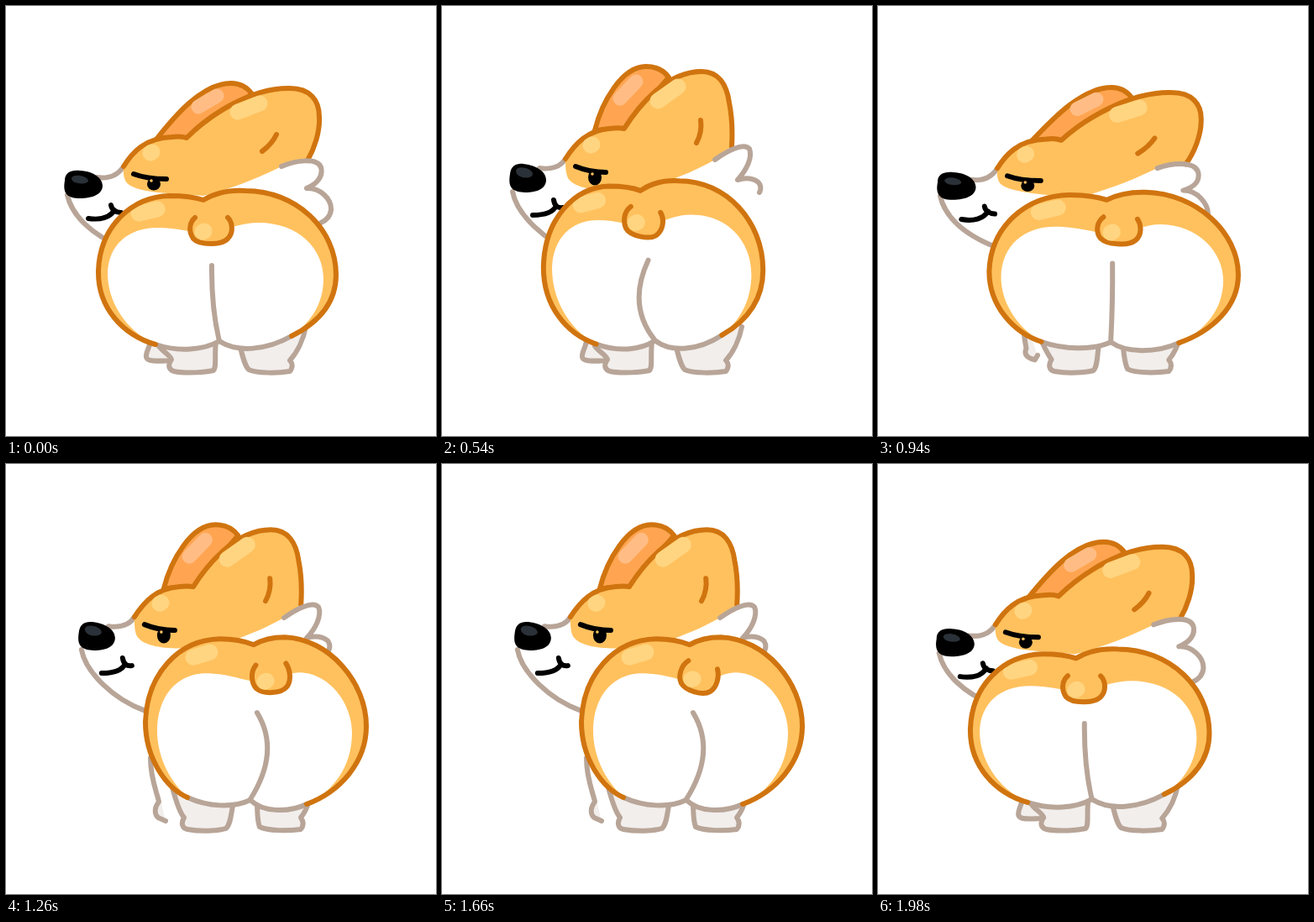
Write an HTML page that moves like this. It is 512x512 px and loops after 2000 ms.

```html
<!DOCTYPE html>
<html lang="en">
<head>
<meta charset="utf-8">
<title>Bouncing corgi</title>
<style>
  html, body { margin: 0; width: 100%; height: 100%; overflow: hidden; background: #fff; }
  svg { display: block; width: 100%; height: 100%; }
  path { fill: none; stroke-width: 6; stroke-linecap: round; stroke-linejoin: round; vector-effect: non-scaling-stroke; }
  .rim { stroke: #d0740f; }
  .grey { stroke: #b8a598; }
  .ink { stroke: #000; }
  .foot { fill: #f2eeec; }
  .fur { fill: #ffc15e; }
  .inner { fill: #ffa551; }
  .white { fill: #fff; }
  .black { fill: #000; }
  .gleam { fill: #2b3138; }
  .shine { stroke: #ffd581; stroke-width: 19; }
  .blush { stroke: #ffbd85; stroke-width: 17; }
</style>
</head>
<body>
<svg viewBox="0 0 512 512">
  <g id="legs"></g>
  <g id="head"></g>
  <g id="rump"></g>
</svg>
<script>
const LOOP = 2000, HALF = 1000, BOUNCE = 400;
const layer = id => document.getElementById(id);
const legs = layer('legs'), head = layer('head'), rump = layer('rump');

const lerp = (a, b, t) => a + (b - a) * t;
const clamp = x => Math.min(1, Math.max(0, x));
const smooth = x => { x = clamp(x); return x * x * (3 - 2 * x); };

// Blend two path strings that share the same commands.
function morph(a, b, t) {
  const to = b.match(/-?[\d.]+/g);
  let i = 0;
  return a.replace(/-?[\d.]+/g, n => lerp(+n, +to[i++], t).toFixed(2) + ' ');
}

function add(parent, cls, tag = 'path') {
  const el = document.createElementNS('http://www.w3.org/2000/svg', tag);
  el.setAttribute('class', cls);
  return parent.appendChild(el);
}

// Each part: [layer, class, path at first pose, path at second pose, optional smirk path].
// Legs and rump blend left to right, the head blends stretched to squashed.
const earTop = [
  'M140 191C150 175 165 157 197 156C205 155 212 156 215 157C240 132 290 97 338 98C362 98 373 112 373 132C374 150 367 170 359 184',
  'M153 182C165 163 180 148 205 146C213 145 219 145 223 146C238 122 272 78 315 78C335 78 345 93 348 115C352 135 352 150 351 167'];
const patch = [
  'L328 191C300 205 270 217 235 226C205 223 150 224 142 208C139 200 140 196 140 191Z',
  'L331 183C310 195 290 203 265 212C225 222 168 224 156 205C153 198 153 190 153 182Z'];
const back = [
  'M178 403C140 392 109 360 110 315C112 262 150 227 195 226C212 226 226 228 235 231C250 222 268 219 285 220C345 220 393 265 393 320C393 355 370 378 340 393',
  'M216 397C190 385 166 350 166 307C168 250 205 209 255 208C272 208 285 211 295 215C305 209 318 206 332 206C385 208 429 260 429 312C429 355 398 390 358 405'];
const under = [
  'C310 410 275 413 254 399C235 410 205 412 178 403',
  'C335 416 305 414 291 400C270 410 240 408 216 397'];
const cheeks = [
  'M178 403C140 385 121 350 121 318C122 285 145 264 180 264C205 264 222 270 243 272C262 266 280 258 300 258C350 258 378 290 378 325C378 355 362 378 340 393',
  'M216 397C192 375 180 345 180 318C180 275 205 249 238 249C262 249 285 258 310 262C325 256 335 248 350 248C385 249 412 285 412 320C412 360 390 390 358 405'];
const join = (a, b) => a.map((s, i) => s + b[i]);

const parts = [
  [legs, 'grey foot',
    'M172 395C173 405 166 411 167 418C168 424 180 423 197 422L190 400',
    'M172 350C172 375 180 392 182 402C176 410 177 417 181 421C190 425 205 423 212 422L200 385'],
  [legs, 'grey foot',
    'M182 405C187 412 195 415 197 421C192 428 194 433 200 435C215 438 238 436 247 434C251 430 248 415 250 400',
    'M198 385C202 400 207 415 212 421C208 428 210 434 216 435C232 438 252 437 262 434C268 428 268 415 271 402'],
  [legs, 'grey foot',
    'M278 402C281 415 284 428 289 433C300 438 325 437 338 435C342 430 341 425 338 422C346 413 354 398 357 382',
    'M299 400C299 412 299 425 302 432C312 437 335 437 351 435C355 430 354 425 351 421C356 415 359 408 361 400'],

  [head, 'rim inner',
    'M178 160C200 132 233 92 268 92C281 92 288 98 293 105L215 157Z',
    'M188 148C196 115 220 72 249 72C263 72 271 78 276 85L223 146Z'],
  [head, 'blush', 'M229 120L251 107', 'M218 110L237 90'],
  [head, 'grey',
    'M73 225C78 248 100 272 140 288', 'M90 221C95 248 128 280 166 294'],
  [head, 'grey',
    'M140 191C133 202 122 206 108 204', 'M153 182C147 192 135 195 122 193'],
  [head, 'fur', ...join(earTop, patch)],
  [head, 'rim', ...earTop],
  [head, 'grey',
    'M328 191C345 184 370 180 375 192C378 203 370 212 358 217C374 216 388 230 387 243C386 250 382 255 375 258',
    'M331 183C345 173 365 162 372 170C376 180 369 195 358 207C372 203 383 207 385 214C386 218 385 220 384 222'],
  [head, 'shine', 'M276 126L302 116', 'M263 113L287 96'],
  [head, 'shine', 'M172 175L174 174', 'M183 166L185 165'],
  [head, 'rim', 'M305 173Q317 164 322 153', 'M309 163Q316 150 314 136'],
  [head, 'black',
    'M70 208C70 198 78 195 88 196C106 197 115 206 115 214C115 224 103 229 88 229C74 229 67 224 70 208Z',
    'M87 200C88 190 95 187 103 188C120 190 130 198 130 207C130 217 120 222 105 222C91 221 84 218 87 200Z'],
  [head, 'gleam',
    'M78 205C80 199 97 202 98 208C98 213 78 213 78 205Z',
    'M94 196C96 189 113 193 114 200C114 207 94 206 94 196Z'],
  [head, 'ink',
    'M152 200C165 205 178 206 191 206', 'M165 191C177 196 190 198 201 198',
    'M162 188C168 197 180 200 194 200'],
  [head, 'ink',
    'M125 237C126 243 131 246 137 246M129 243C124 252 112 255 98 253',
    'M139 231C140 238 144 241 150 240M142 238C138 246 128 249 114 249',
    'M122 229C123 234 127 237 133 237M125 236C126 250 116 256 104 252'],

  [rump, 'fur', ...join(back, under)],
  [rump, 'shine', 'M158 247L180 242', 'M223 230L243 224'],
  [rump, 'white', ...join(cheeks, under)],
  [rump, 'grey', ...join(['M340 393', 'M358 405'], under)],
  [rump, 'rim', ...back]
].map(([group, cls, a, b, smirk]) => ({ el: add(group, cls), group, a, b, smirk }));

const eye = add(head, 'black', 'ellipse');
const glint = add(head, 'fur', 'circle');
const crack = add(rump, 'grey');
const tail = add(rump, '', 'g');
const tailBody = add(tail, 'rim fur'), tailShine = add(tail, 'shine');

const set = (el, attrs) => { for (const k in attrs) el.setAttribute(k, attrs[k]); };

function draw(now) {
  const t = now % LOOP, u = t % HALF;
  const step = smooth((u - 870) / 120);
  const side = t < HALF ? step : 1 - step;
  const hopping = u < 2 * BOUNCE;

  // 1 is squashed, 0 is tall; the crossing dips lower still.
  const squash = hopping
    ? 0.375 + 0.625 * Math.cos(2 * Math.PI * u / BOUNCE)
    : 1 + 0.4 * Math.sin(Math.PI * (u - 800) / 200) ** 2;
  const smirk = smooth(1 - Math.abs(t - 330) / 180);

  for (const { el, group, a, b, smirk: c } of parts) {
    let d = morph(a, b, group === head ? 1 - squash : side);
    if (c) d = morph(d, c, smirk);
    el.setAttribute('d', d);
  }

  set(head, { transform: `translate(${6 * (side + squash - 1)} 0)` });
  const ex = lerp(188, 176, squash), ey = lerp(204, 212, squash);
  set(eye, { cx: ex, cy: ey, rx: 8, ry: lerp(9.5, 7.5, squash) });
  set(glint, { cx: ex - 3, cy: ey - 4, r: 1.8 });

  const mid = lerp(252, 298, side);
  const sx = (266 + 22 * squash ** 2) / lerp(288, 266, side);
  const sy = (205 - 12 * squash) / lerp(193, 205, side);
  set(rump, { transform: `translate(${mid} 410) scale(${sx} ${sy}) translate(${-mid} -410)` });

  const x1 = lerp(245, 299, side), y1 = lerp(309, 296, side), x2 = lerp(254, 291, side);
  const bulge = (2 * side - 1) * Math.max(5, 32 - 27 * squash ** 3);
  set(crack, { d: `M${x1} ${y1}Q${(x1 + x2) / 2 + bulge} ${lerp(360, 342, side)} ${x2} 399` });

  const wag = 8 * side - (hopping ? 11 * Math.sin(Math.PI * u / BOUNCE) : 0);
  set(tail, { transform: `rotate(${wag} ${lerp(242, 311, side)} ${lerp(236, 225, side)})` });
  set(tailBody, { d: morph(
    'M225 252C217 259 218 270 223 277C230 285 257 285 264 277C271 270 270 258 264 252',
    'M297 239C290 247 291 261 297 267C305 274 326 274 333 266C339 259 338 246 333 238', side) });
  set(tailShine, { d: morph('M234 269L236 268', 'M307 259L309 258', side) });
}

function frame(now) {
  draw(now);
  requestAnimationFrame(frame);
}
draw(0);
requestAnimationFrame(frame);
</script>
</body>
</html>
```
